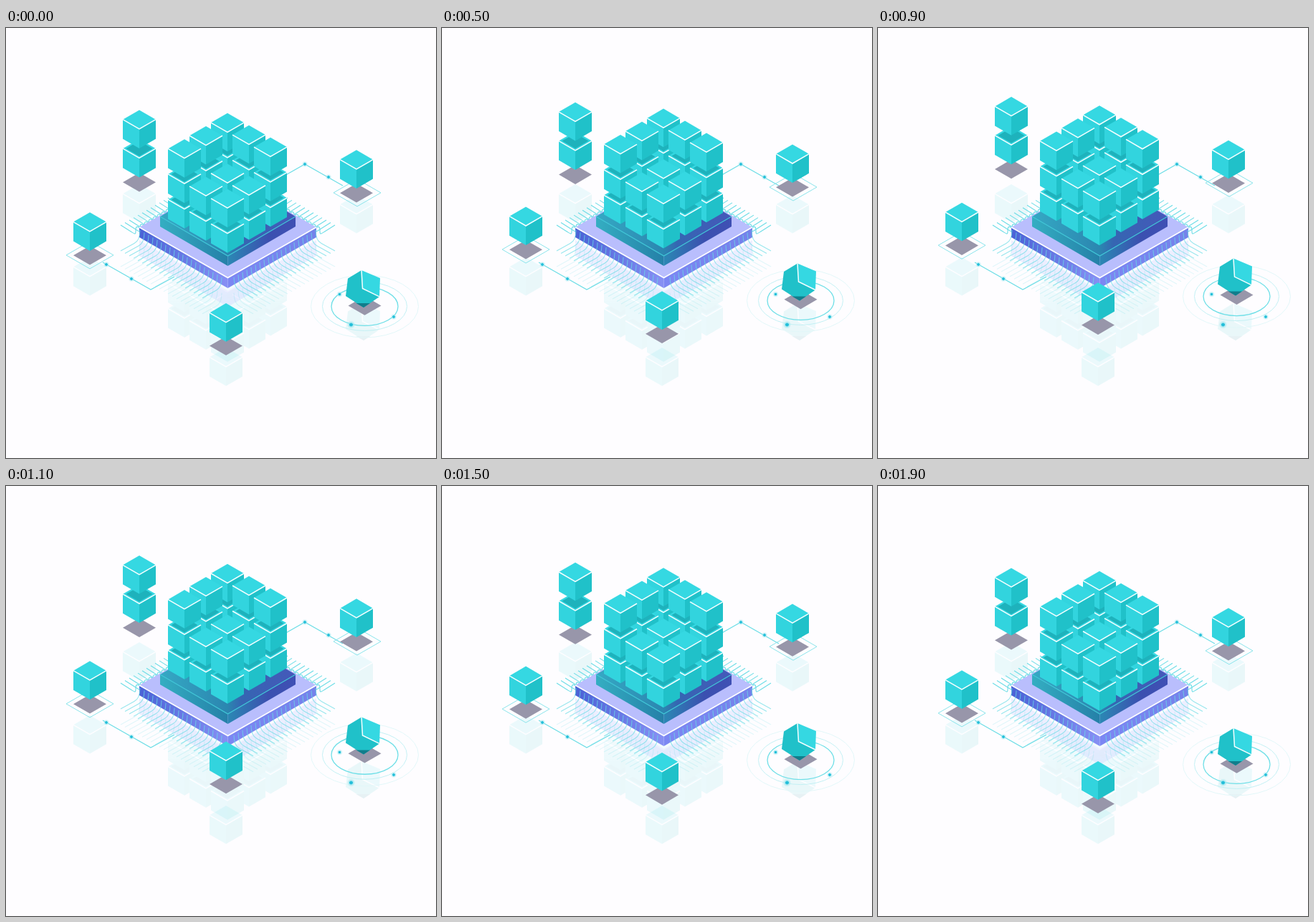
Animation of 600 by 600 pixels, one loop 2000 ms. Source, as an HTML page:

```html
<!DOCTYPE html>
<html lang="en">
<head>
<meta charset="utf-8">
<title>Floating cubes</title>
<style>
  html, body { margin: 0; width: 100%; height: 100%; overflow: hidden; background: #fefdff; }
  svg { display: block; width: 100vw; height: 100vh; }
  .line { fill: none; stroke: #6bdde6; stroke-width: 1.1; }
</style>
</head>
<body>
<svg id="stage" viewBox="0 0 600 600">
  <defs>
    <linearGradient id="sideLeft"><stop stop-color="#4a62d6"/><stop offset="1" stop-color="#8790f4"/></linearGradient>
    <linearGradient id="sideRight"><stop stop-color="#7c87f3"/><stop offset="1" stop-color="#7482ea"/></linearGradient>
    <linearGradient id="glassTop"><stop stop-color="#35a9c4"/><stop offset=".5" stop-color="#2b86b0"/><stop offset=".6" stop-color="#3566b2"/><stop offset="1" stop-color="#4558ba"/></linearGradient>
    <linearGradient id="glassLeft"><stop stop-color="#34aec2"/><stop offset="1" stop-color="#2580a8"/></linearGradient>
    <linearGradient id="glassRight"><stop stop-color="#2b88b4"/><stop offset=".6" stop-color="#3b50b0"/><stop offset="1" stop-color="#3f50b4"/></linearGradient>
    <linearGradient id="fade" gradientUnits="userSpaceOnUse" x1="0" y1="325" x2="0" y2="385">
      <stop stop-color="#000"/><stop offset="1" stop-color="#fff"/>
    </linearGradient>
    <mask id="fadeMask" maskUnits="userSpaceOnUse" x="0" y="0" width="600" height="600">
      <rect width="600" height="600" fill="url(#fade)"/>
    </mask>
    <radialGradient id="glow">
      <stop stop-color="#1fb9d6"/><stop offset=".38" stop-color="#2cc3dc"/>
      <stop offset=".5" stop-color="#8fe2ec" stop-opacity=".75"/><stop offset="1" stop-color="#b5eef3" stop-opacity=".15"/>
    </radialGradient>
  </defs>
</svg>
<script>
const HALF = 23, RISE = 13.3, SIDE = 27;
const STEP = 30, LEFT_DROP = 18.2, RIGHT_DROP = 17, LAYER = 35.5;
const COLORS = { top: '#35d8e2', left: '#32d4de', right: '#20c1c9', shade: '#1bacb5', shadow: '#9896aa' };

const poly = (points, fill, attrs = '') => `<polygon points="${points}" fill="${fill}" ${attrs}/>`;
const path = (d, attrs = 'class="line"') => `<path d="${d}" ${attrs}/>`;
const edge = d => path(d, 'fill="none" stroke="#f4feff" stroke-width="1.5"');
const group = (content, attrs) => `<g ${attrs}>${content}</g>`;
const floating = (amplitude, content) => group(content, `data-amplitude="${amplitude}"`);
const ghost = content => group(content, 'opacity=".09"');
const dot = (x, y, r) => `<circle cx="${x}" cy="${y}" r="${r}" fill="url(#glow)"/>`;

const diamond = (x, y, w, h, fill, attrs) =>
  poly([x - w, y, x, y - h, x + w, y, x, y + h], fill, attrs);
const shadow = (x, y) => diamond(x, y, HALF, RISE, COLORS.shadow);
const frame = (x, y) => diamond(x, y, 33, 19, 'none', 'stroke="#8be4eb" stroke-width="1"');

// A cube placed by the back corner of its top face.
function cube(x, y, covered = false) {
  const l = x - HALF, r = x + HALF, mid = y + RISE, front = y + 2 * RISE;
  return poly([l, mid, x, front, x, front + SIDE, l, mid + SIDE], COLORS.left) +
    poly([r, mid, x, front, x, front + SIDE, r, mid + SIDE], COLORS.right) +
    diamond(x, mid, HALF, RISE, COLORS.top) +
    (covered ? diamond(x, mid, 18.5, 10.7, COLORS.shade, 'opacity=".85"') : '') +
    edge(`M${l},${mid}L${x},${front}L${r},${mid}`);
}

// 3 x 3 x 3 stack; the top layer keeps only its two back rows.
function stack(dy = 0) {
  let out = '';
  for (let layer = 2; layer >= 0; layer--)
    for (let depth = 0; depth <= 4; depth++)
      for (let a = 0; a < 3; a++) {
        const b = depth - a;
        if (b < 0 || b > 2) continue;
        const backRow = a === 0 || b === 0;
        if (layer === 0 && !backRow) continue;
        out += cube(309 + STEP * (b - a), 118.8 + dy + a * LEFT_DROP + b * RIGHT_DROP + layer * LAYER,
          layer === 2 || (layer === 1 && backRow));
      }
  return out;
}

function tiltedCube(dy = 0) {
  return group(
    poly([496, 338, 477, 349.5, 474, 374, 499, 390, 521, 375, 497.5, 363.5], COLORS.right) +
    poly([496, 338, 522, 349, 521, 375, 497.5, 363.5], COLORS.top) +
    poly([488.5, 384, 508, 384, 499, 390], '#117d8b') +
    edge('M496,338L497.5,363.5L521,375'),
    `transform="translate(0 ${dy})"`);
}

const mirror = content => content + group(content, 'transform="matrix(-1 0 0 1 619 0)"');

function legs(count, slope, d) {
  let out = '';
  for (let i = 0; i < count; i++)
    out += path(d, `class="line" transform="translate(${187 + 6 * i} ${279 + slope * 6 * i})"`);
  return mirror(out);
}
const backLegs = legs(13, -.577, 'M0,0C-6,-4 -6,0 -6,5S-8,8 -12,5.5L-27,-4');
const frontLegs = legs(20, .577, 'M0,3C0,10 -1,18 -8,21.5L-27,32');

const base =
  poly([186, 296, 309.5, 367, 433, 296, 433, 318, 309.5, 389, 186, 318], '#b9bdfd', 'opacity=".24"') +
  group(frontLegs, 'opacity=".2" transform="translate(0 22)"') +
  backLegs +
  poly([186, 278, 309.5, 348.5, 309.5, 363, 186, 292], 'url(#sideLeft)') +
  poly([433, 278, 309.5, 348.5, 309.5, 363, 433, 292], 'url(#sideRight)') +
  diamond(309.5, 278, 123.5, 70.5, '#b9befd') +
  path('M186,278L309.5,348.5L433,278', 'fill="none" stroke="#fff" stroke-width="1.6"') +
  group(frontLegs, 'opacity=".7"') +
  diamond(309.5, 263, 94.5, 55, 'url(#glassTop)') +
  poly([215, 263, 309.5, 318, 309.5, 332, 215, 277], 'url(#glassLeft)') +
  poly([404, 263, 309.5, 318, 309.5, 332, 404, 277], 'url(#glassRight)') +
  path('M215,263L309.5,318L404,263', 'fill="none" stroke="#3fc6d6" stroke-width="1.1"');

const ring = (rx, ry, stroke, width) =>
  `<ellipse cx="500.5" cy="388.5" rx="${rx}" ry="${ry}" fill="none" stroke="${stroke}" stroke-width="${width}"/>`;

const stage = document.getElementById('stage');
stage.innerHTML += [
  ghost(cube(117, 320)), ghost(cube(186, 218)), ghost(cube(489, 233)),
  group(ghost(stack(152)), 'mask="url(#fadeMask)"'),
  ghost(cube(307, 446)), ghost(tiltedCube(46)),
  path('M380,211L417,190L470,220'), dot(417, 190, 4), dot(450, 208, 4),
  path('M135,327L202,365L235,347'), dot(140, 330, 4), dot(175, 350, 4),
  base,
  floating(10.7, stack()),
  floating(18.5, shadow(186, 215.3) + cube(186, 155, true) + cube(186, 114.5)),
  floating(13.8, frame(117, 317) + shadow(117, 317.3) + cube(117, 257.4)),
  floating(13.8, frame(490, 230) + shadow(489, 230.3) + cube(489, 170.4)),
  floating(14, ring(75, 43.5, '#e2f7f9', 1) + ring(59, 34, '#c3f0f4', 1) + ring(46.5, 27, '#6fdfe7', 1.3)),
  dot(465.5, 371.5, 4), dot(541, 403, 4), dot(481.5, 414, 5.5),
  floating(15, shadow(500.5, 387.5)),
  floating(16.5, tiltedCube()),
  floating(29.3, shadow(307, 443.7) + cube(307, 384.3)),
].join('');

const floaters = [...stage.querySelectorAll('[data-amplitude]')];
const TICK = 100, LOOP = 2000, LEAD = 10;
let start;

// Motion advances in 100 ms ticks along one cosine swing.
function render(now) {
  start ??= now;
  const tick = Math.floor((now - start + LEAD) / TICK) + .5;
  const lift = (1 - Math.cos(2 * Math.PI * tick * TICK / LOOP)) / 2;
  for (const el of floaters)
    el.setAttribute('transform', `translate(0 ${(-lift * el.dataset.amplitude).toFixed(2)})`);
  requestAnimationFrame(render);
}
requestAnimationFrame(render);
</script>
</body>
</html>
```
